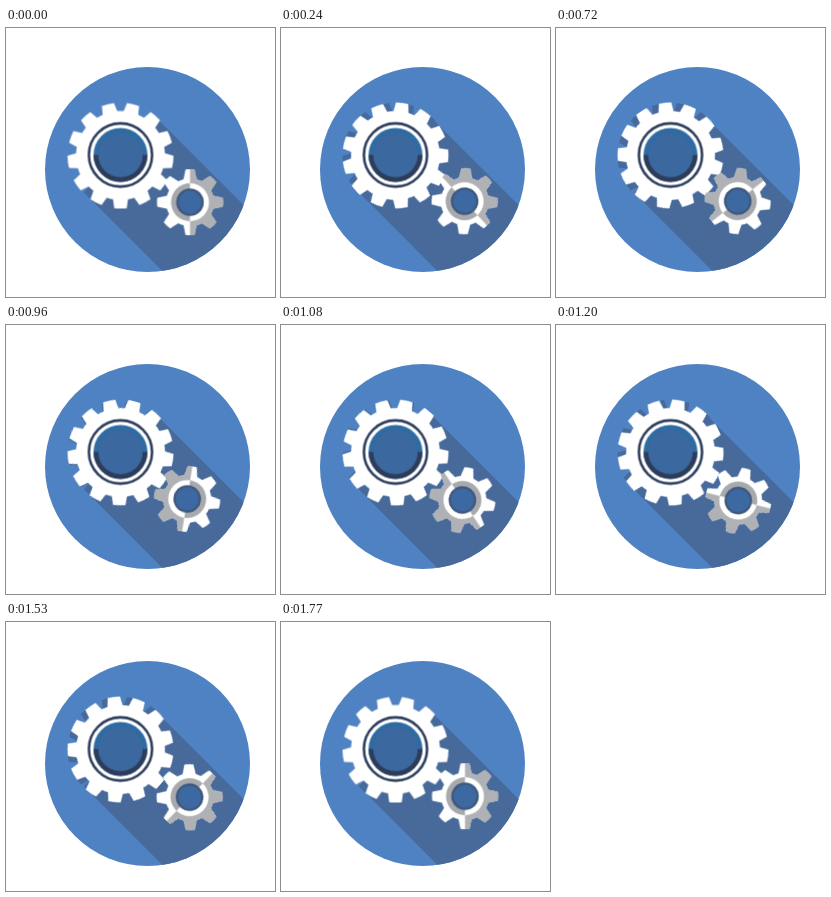
An HTML page for the animation above (1.8 s loop, 269 by 269 pixels).

```html
<!DOCTYPE html>
<html lang="en">
<head>
<meta charset="utf-8">
<title>Turning gears</title>
<style>
  html, body { margin: 0; width: 100%; height: 100%; overflow: hidden; background: #fff; }
  svg { display: block; width: 100vw; height: 100vh; }
  /* 60 poses of 30 ms; the first and the last one coincide */
  .big { animation: turn 1800ms steps(60, jump-none) infinite; }
  .small { animation: counter 1800ms infinite; }
  @keyframes turn { to { transform: rotate(360deg); } }
  /* steady, then a quicker stretch, then steady again */
  @keyframes counter {
    0% { transform: rotate(0deg); animation-timing-function: steps(32); }
    53.333% { transform: rotate(-171deg); animation-timing-function: steps(8); }
    66.666% { transform: rotate(-256deg); animation-timing-function: steps(19); }
    98.333%, 100% { transform: rotate(-360deg); }
  }
</style>
</head>
<body>
<svg viewBox="0 0 269 269">
  <defs>
    <path id="big"/>
    <path id="small"/>
    <clipPath id="badge"><circle cx="141.5" cy="141.5" r="102.5"/></clipPath>
    <clipPath id="half"><rect x="0" y="-40" width="40" height="80"/></clipPath>
  </defs>

  <circle cx="141.5" cy="141.5" r="102.5" fill="#4e82c3"/>

  <g clip-path="url(#badge)" fill="#476a9b">
    <path d="M77.7 164.3 L151.3 90.7 L271.3 210.7 L197.7 284.3Z"/>
    <use href="#big" x="114.5" y="127.5"/>
    <use href="#small" x="184" y="174"/>
  </g>

  <g transform="translate(114.5 127.5)">
    <use class="big" href="#big" fill="#fff"/>
    <g transform="translate(0 -.5)">
      <circle r="31.6" fill="#fff" stroke="#2d3d5c" stroke-width="2.6"/>
      <circle r="27" fill="#2f6ba3"/>
      <path d="M-27 0 A27 27 0 0 0 27 0Z" fill="#2d3c59"/>
      <circle r="22.3" fill="#3b689f"/>
    </g>
  </g>

  <g transform="translate(182.6 174.2)">
    <g class="small">
      <g transform="translate(1.4 0)">
        <use href="#small" fill="#fff"/>
        <g clip-path="url(#half)"><use href="#small" fill="#b0b1b5"/></g>
        <circle r="19" fill="#a7a9ad"/>
        <path d="M0 -19 A19 19 0 0 1 0 19Z" fill="#fff"/>
        <circle r="13.8" fill="#40587d"/>
        <circle r="11.4" fill="#3c69a1"/>
      </g>
    </g>
  </g>
</svg>
<script>
  // Gear outline around the origin, with a gap at the top; widths are those of a tooth.
  function gear(teeth, root, tip, rootWidth, tipWidth, turn) {
    const point = (angle, r, side) => {
      const a = angle + Math.asin(side / r);
      return (r * Math.sin(a)).toFixed(2) + ' ' + (-r * Math.cos(a)).toFixed(2);
    };
    const arc = r => `A${r} ${r} 0 0 1 `;
    let d = '';
    for (let i = 0; i < teeth; i++) {
      const a = (i + turn) * 2 * Math.PI / teeth;
      d += (i ? arc(root) : 'M') + point(a, root, -rootWidth / 2) +
        'L' + point(a, tip, -tipWidth / 2) +
        arc(tip) + point(a, tip, tipWidth / 2) +
        'L' + point(a, root, rootWidth / 2);
    }
    return d + 'Z';
  }

  const shape = (id, ...args) => document.getElementById(id).setAttribute('d', gear(...args));
  shape('big', 13, 44.5, 53, 15, 12.5, 0.5);
  shape('small', 8, 24, 33, 13, 9, 0);
</script>
</body>
</html>
```
